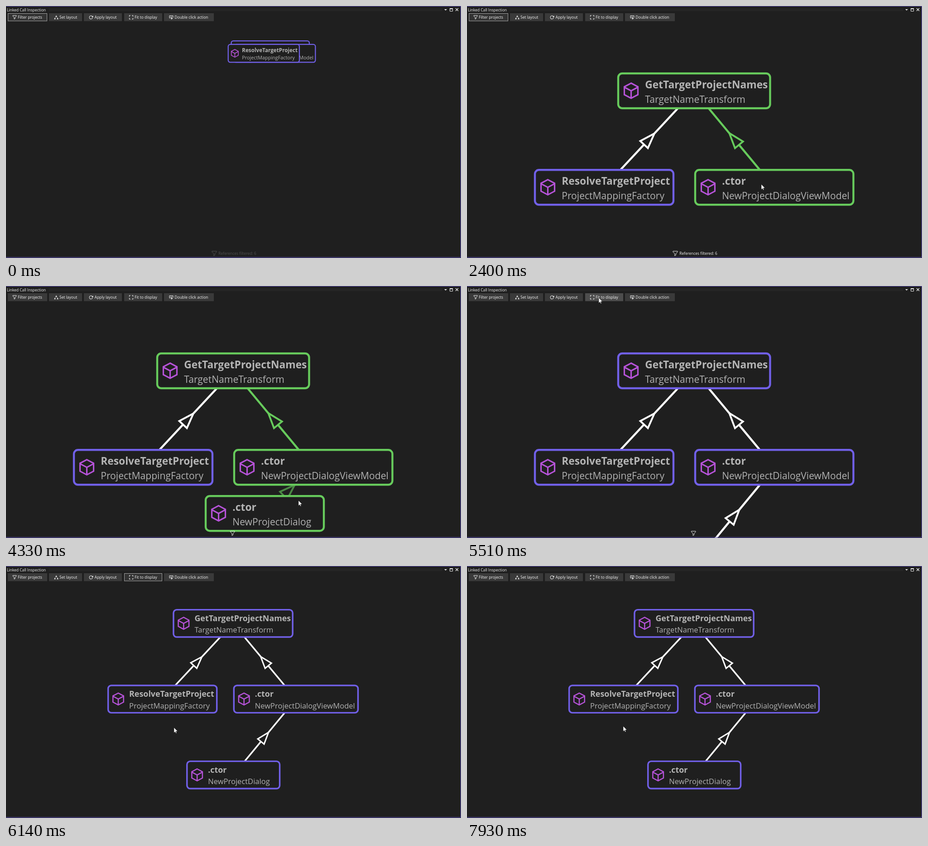
An HTML page with a canvas that plays this animation: 1005x557 px, repeating every 8000 ms.

```html
<!DOCTYPE html>
<html lang="en">
<head>
<meta charset="utf-8">
<title>Linked Call Inspection</title>
<style>
  html, body { margin: 0; width: 100%; height: 100%; overflow: hidden; background: #1f1f1f; }
  canvas { display: block; width: 1005px; height: 557px; }
</style>
</head>
<body>
<canvas id="stage" width="1005" height="557"></canvas>
<script>
const ctx = document.getElementById('stage').getContext('2d');
const LOOP = 8000;
const FONT = '"Open Sans", "Noto Sans", sans-serif';
const BG = '#1f1f1f', PURPLE = '#7160e8', GREEN = '#67cb5c', CUBE = '#b653d8';
const SMALL = `8.5px ${FONT}`;
const NODE_H = 81;

const nodes = {
  root:    { x: 332, y: 147,   w: 339.5, title: 'GetTargetProjectNames', sub: 'TargetNameTransform' },
  ctor:    { x: 502, y: 360.3, w: 353.5, title: '.ctor', sub: 'NewProjectDialogViewModel', parent: 'root' },
  resolve: { x: 148, y: 360.3, w: 310,   title: 'ResolveTargetProject', sub: 'ProjectMappingFactory', parent: 'root' },
  dialog:  { x: 370, y: 574,   w: 265,   title: '.ctor', sub: 'NewProjectDialog', parent: 'ctor' }
};

// Time, scale, offset x, offset y
const viewKeys = [
  [0, 0.513, 326.5, 0.5], [540, 0.96, 25.9, 1.9], [760, 0.96, 25.9, 1.9], [865, 1, 0, 0],
  [5590, 1, 0, 0], [5720, 0.7846, 107.9, -20.3]
];

// Time, x, y of the pointer tip
const cursorKeys = [
  [2060, 606, 495], [2130, 624, 436], [2200, 650, 394], [3100, 650, 394], [3450, 641, 479],
  [3600, 641, 479], [3720, 646, 474], [4720, 646, 474], [5500, 291, 26], [5550, 291, 26],
  [6120, 371, 357], [6400, 371, 357], [6640, 345, 306], [6950, 345, 306], [7190, 306, 328],
  [7230, 306, 328], [7600, 345, 354]
];

const menus = [
  { x: 502, y: 441.5, w: 291.5, from: 2470, to: 3920, items: [
    'Delete node',
    'Find references to constructor for type NewProjectDialogViewModel',
    'Go to NewProjectDialogViewModel.cs, Line: 28'] },
  { x: 224, y: 326.5, w: 211, from: 6720, to: 7860, items: [
    'Delete node',
    'Find references to method ResolveTargetProject',
    'Go to ProjectMappingFactory.cs, Line: 28'] }
];

// Spans during which a node and its ancestors are lit
const hovers = [
  { from: 2130, to: 2470, path: ['ctor', 'root'] },
  { from: 4120, to: 4375, path: ['dialog', 'ctor', 'root'] },
  { from: 6510, to: 6720, path: ['resolve', 'root'] }
];

const clamp = v => Math.max(0, Math.min(1, v));
const lerp = (a, b, p) => a + (b - a) * p;
const during = (t, from, to) => t >= from && t < to;

function sample(keys, t) {
  const next = keys.findIndex(k => k[0] > t);
  if (next < 0) return keys[keys.length - 1].slice(1);
  if (next === 0) return keys[0].slice(1);
  const a = keys[next - 1], b = keys[next];
  const p = (t - a[0]) / (b[0] - a[0]);
  return a.slice(1).map((v, i) => lerp(v, b[i + 1], p));
}

function line(points, closed) {
  ctx.beginPath();
  points.forEach(([x, y]) => ctx.lineTo(x, y));
  if (closed) ctx.closePath();
}

function strokeLine(points, color, width = 1, closed = false) {
  line(points, closed);
  ctx.strokeStyle = color;
  ctx.lineWidth = width;
  ctx.stroke();
}

function fillShape(points, color) {
  line(points, true);
  ctx.fillStyle = color;
  ctx.fill();
}

function text(str, x, y, font = SMALL, color = '#f6f6f6') {
  ctx.font = font;
  ctx.fillStyle = color;
  ctx.fillText(str, x, y);
}

function rect(x, y, w, h, fill, border) {
  ctx.fillStyle = fill;
  ctx.fillRect(x, y, w, h);
  if (!border) return;
  ctx.strokeStyle = border;
  ctx.lineWidth = 1;
  ctx.strokeRect(x + 0.5, y + 0.5, w - 1, h - 1);
}

function funnel(x, y, size) {
  const k = size / 10;
  const shape = [[0, 0], [10, 0], [10, 1.6], [6.4, 5.4], [6.4, 8.6], [3.8, 10], [3.8, 5.4], [0, 1.6]];
  strokeLine(shape.map(([px, py]) => [x + px * k, y + py * k]), '#f0f0f0', 1, true);
}

const icons = {
  filter(x, y) { funnel(x + 0.5, y - 4, 8); },
  layout(x, y) {
    strokeLine([[x + 1.5, y + 2.5], [x + 4.5, y - 2.5], [x + 7.5, y + 2.5]], '#bbb', 0.8);
    for (const [dx, dy] of [[4.5, -2.5], [1.5, 2.6], [7.5, 2.6]])
      fillShape([[x + dx, y + dy - 2], [x + dx + 1.8, y + dy + 1.6], [x + dx - 1.8, y + dy + 1.6]], '#f0f0f0');
  },
  refresh(x, y) {
    ctx.beginPath();
    ctx.arc(x + 4.2, y + 0.2, 3.6, 0.3, Math.PI * 1.8);
    ctx.strokeStyle = '#f0f0f0';
    ctx.lineWidth = 1.1;
    ctx.stroke();
    fillShape([[x + 9, y - 3.5], [x + 9, y + 0.3], [x + 5.4, y - 0.4]], '#f0f0f0');
  },
  fit(x, y) {
    for (const sx of [-1, 1]) for (const sy of [-1, 1])
      strokeLine([[x + 4.5 + sx * 1.5, y + sy * 4], [x + 4.5 + sx * 4, y + sy * 4],
        [x + 4.5 + sx * 4, y + sy * 1.5]], '#f0f0f0', 1.1);
  },
  click(x, y) {
    strokeLine([[x + 3, y + 1.5], [x + 0.5, y + 1.5], [x + 0.5, y - 3.5], [x + 8.5, y - 3.5], [x + 8.5, y + 1]], '#f0f0f0');
    strokeLine([[x + 2, y - 1], [x + 7, y - 1]], '#f0f0f0', 0.8);
    fillShape([[x + 4, y - 0.5], [x + 8.5, y + 3], [x + 6, y + 3.4], [x + 4.3, y + 5]], '#f0f0f0');
  }
};

// Left, right, icon x, text x, label, icon
const buttons = [
  [4, 91, 14.5, 26, 'Filter projects', 'filter'],
  [95, 168, 106.5, 118, 'Set layout', 'layout'],
  [172, 256, 183.5, 195.5, 'Apply layout', 'refresh'],
  [261, 345, 272, 284, 'Fit to display', 'fit'],
  [349, 459, 360.5, 372.3, 'Double click action', 'click']
];

function drawChrome(t) {
  text('Linked Call Inspection', 2, 11.7);
  ctx.fillStyle = '#414141';
  for (let row = 0; row < 3; row++)
    for (let x = 95 + (row % 2) * 1.5; x < 963; x += 3) ctx.fillRect(x, 6 + row * 2, 1, 1);
  fillShape([[968, 7], [974, 7], [971, 10]], '#f0f0f0');
  strokeLine([[980.5, 5.5], [986.5, 5.5], [986.5, 11.5], [980.5, 11.5]], '#f0f0f0', 1, true);
  ctx.fillStyle = '#f0f0f0';
  ctx.fillRect(980, 5, 7, 2);
  strokeLine([[993, 5], [999, 11]], '#f0f0f0', 1.2);
  strokeLine([[999, 5], [993, 11]], '#f0f0f0', 1.2);

  for (const [left, right, iconX, textX, label, icon] of buttons) {
    const focused = icon === 'filter' ? t < 2450 : icon === 'fit' && during(t, 5580, 6720);
    const hovered = icon === 'fit' && during(t, 5480, 5590);
    rect(left, 16, right - left, 17.5, hovered ? '#4d4d4d' : focused ? '#333' : '#3a3a3a', focused && '#a5a5a5');
    icons[icon](iconX, 25);
    text(label, textX, 28.2);
  }

  ctx.fillStyle = '#5b4fb8';
  ctx.fillRect(0, 0, 1005, 1);
  ctx.fillRect(0, 555, 1005, 1);
  ctx.fillRect(1004, 0, 1, 556);
}

function place(node, progress) {
  const parent = nodes[node.parent];
  if (!parent) return { ...node };
  return { ...node, x: lerp(parent.x, node.x, progress), y: lerp(parent.y, node.y, progress) };
}

function drawEdge(from, to, color, alpha) {
  const ax = from.x + from.w / 2, ay = from.y + NODE_H / 2;
  const bx = to.x + to.w / 2, by = to.y + NODE_H / 2;
  const length = Math.hypot(bx - ax, by - ay);
  if (length < 40) return;
  const ux = (bx - ax) / length, uy = (by - ay) / length;
  const at = (along, across) => [(ax + bx) / 2 + ux * along - uy * across, (ay + by) / 2 + uy * along + ux * across];
  ctx.globalAlpha = alpha;
  strokeLine([[ax, ay], at(-17, 0)], color, 4.5);
  strokeLine([at(17, 0), [bx, by]], color, 4.5);
  strokeLine([at(17, 0), at(-16.5, 11.5), at(-16.5, -11.5)], color, 4, true);
  ctx.globalAlpha = 1;
}

function drawNode({ x, y, w, title, sub }, color) {
  ctx.beginPath();
  ctx.roundRect(x + 2, y + 2, w - 4, NODE_H - 4, 9);
  ctx.fillStyle = BG;
  ctx.fill();
  ctx.strokeStyle = color;
  ctx.lineWidth = 4.4;
  ctx.stroke();

  const cx = x + 30.5, cy = y + 40.5;
  strokeLine([[cx, cy - 17], [cx + 15, cy - 9], [cx + 15, cy + 8.5], [cx, cy + 16.5],
    [cx - 15, cy + 8.5], [cx - 15, cy - 9]], CUBE, 3.2, true);
  strokeLine([[cx - 15, cy - 8], [cx, cy], [cx + 15, cy - 8]], CUBE, 3.2);
  strokeLine([[cx, cy], [cx, cy + 16]], CUBE, 3.2);

  text(title, x + 61.2, y + 34.5, `bold 22.8px ${FONT}`, '#b4b4b4');
  text(sub, x + 61.2, y + 66.8, `21.1px ${FONT}`, '#b2b2b2');
}

function drawGraph(t) {
  const first = clamp((t + 42) / 600);
  const added = clamp((t - 4013) / 667);
  const hover = hovers.find(h => during(t, h.from, h.to));
  const lit = hover ? hover.path : [];
  const placed = {};
  for (const name in nodes) {
    if (name === 'dialog' && t < 4013) continue;
    placed[name] = place(nodes[name], name === 'dialog' ? added : first);
  }

  const [scale, x, y] = sample(viewKeys, t);
  ctx.save();
  ctx.translate(x, y);
  ctx.scale(scale, scale);
  for (const name in placed) {
    const { parent } = placed[name];
    const alpha = clamp((name === 'dialog' ? added : first) * 1.3);
    if (parent) drawEdge(placed[name], placed[parent], lit.includes(name) ? GREEN : '#fff', alpha);
  }
  for (const name in placed) drawNode(placed[name], lit.includes(name) ? GREEN : PURPLE);
  ctx.restore();
}

function drawFooter(t) {
  if (t >= 5600) return;
  const filtered = t < 4000;
  ctx.globalAlpha = clamp(0.22 + t / 600);
  funnel(filtered ? 455 : 495.5, 542, filtered ? 10 : 9.5);
  if (filtered) text('References filtered: 6', 469.3, 550);
  ctx.globalAlpha = 1;
}

function drawMenu(menu, t, tip) {
  if (!during(t, menu.from, menu.to)) return;
  const { x, y, w } = menu;
  ctx.globalAlpha = clamp((t - menu.from) / 220);
  rect(x, y, w, 56, '#252525', '#383838');
  menu.items.forEach((label, i) => {
    const top = y + 1.5 + i * 19.2;
    const over = tip[0] > x && tip[0] < x + w && tip[1] > top && tip[1] < top + 16;
    if (over) rect(x + 1, top, w - 2, 16, '#3d3d3d');
    text(label, x + 10, y + 10.8 + i * 19.2);
    if (i) strokeLine([[x + 23, y + i * 19 + 0.2], [x + w, y + i * 19 + 0.2]], '#c4c4c4');
  });
  ctx.globalAlpha = 1;
}

function drawCursor([x, y]) {
  const shape = [[0, 0], [0, 11.7], [2.7, 9.3], [4.4, 13], [6.1, 12.2], [4.5, 8.6], [8, 8.3]];
  const points = shape.map(([px, py]) => [x + px, y + py]);
  fillShape(points, '#fff');
  strokeLine(points, '#111', 0.6, true);
}

function draw(t) {
  const tip = sample(cursorKeys, t);
  rect(0, 0, 1005, 557, BG);
  drawGraph(t);
  drawFooter(t);
  drawChrome(t);
  menus.forEach(menu => drawMenu(menu, t, tip));
  if (t >= cursorKeys[0][0]) drawCursor(tip);
}

const start = performance.now();
function tick() {
  draw((performance.now() - start) % LOOP);
  requestAnimationFrame(tick);
}
tick();
</script>
</body>
</html>
```
